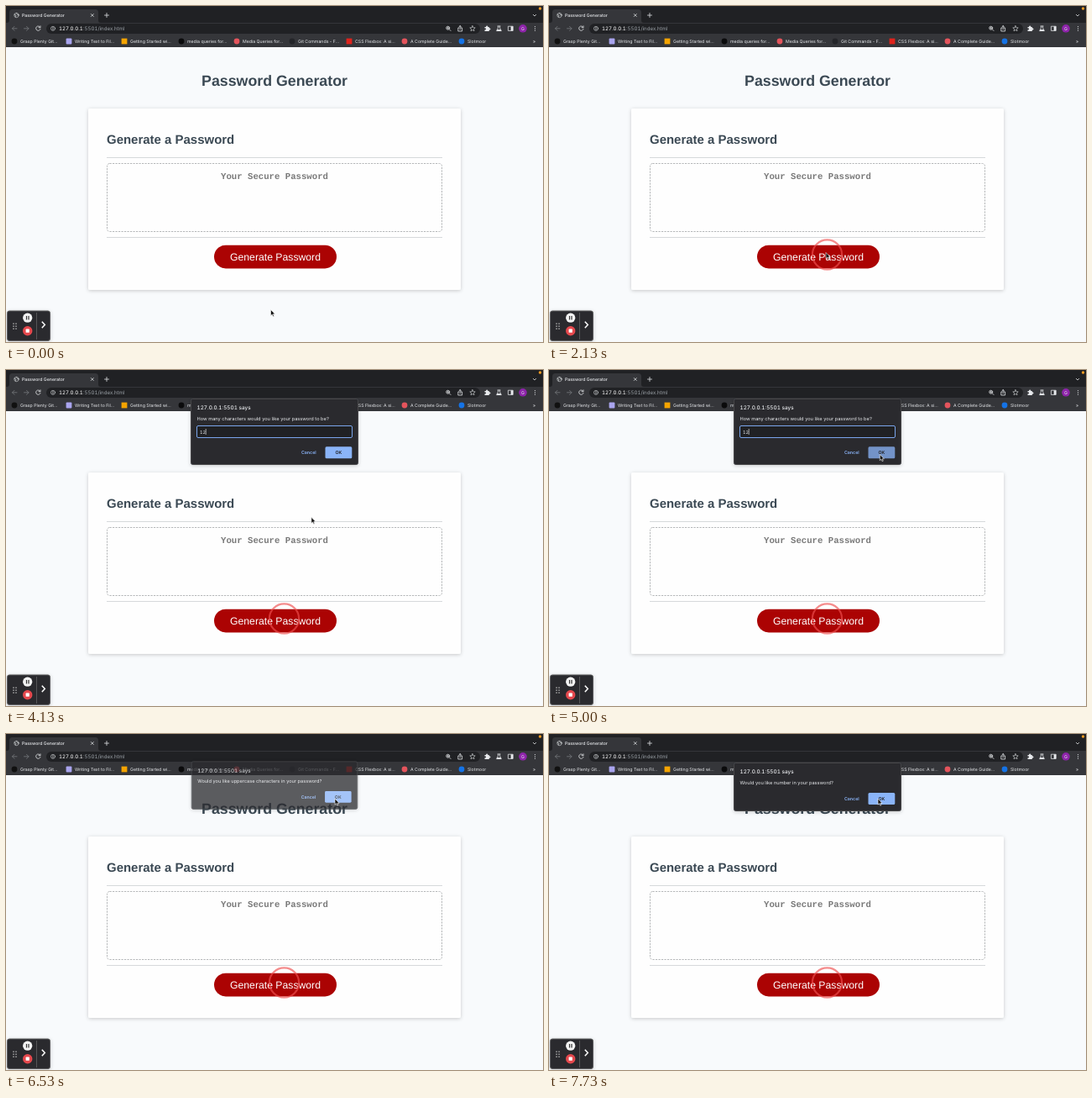
These frames come from a looping animation (640x400 px, 8000 ms). An HTML page:

```html
<!DOCTYPE html>
<html lang="en">
<head>
<meta charset="utf-8">
<title>Password Generator</title>
<style>
  html, body { margin: 0; width: 100%; height: 100%; overflow: hidden; background: #f8fafc; }
  svg { display: block; width: 100vw; height: 100vh; font-family: Inter, Roboto, sans-serif; text-rendering: geometricPrecision; }
  .page { font-family: "Liberation Sans", Arial, sans-serif; fill: #3b4954; }
  .mono { font-family: "Liberation Mono", "Courier New", monospace; }
  .line { fill: none; stroke: #e0e2e5; stroke-width: .8; stroke-linecap: round; stroke-linejoin: round; }
  .dim { stroke: #77797d; }
  .small { font-size: 5.22px; fill: #e8eaed; }
  .mid { text-anchor: middle; }
  .digits { font-feature-settings: "tnum"; }
</style>
</head>
<body>
<svg viewBox="0 0 640 400">
  <defs>
    <filter id="soft" x="-10%" y="-10%" width="120%" height="125%">
      <feDropShadow dx="0" dy="1" stdDeviation="2" flood-opacity=".2"/>
    </filter>
  </defs>

  <!-- page -->
  <rect width="640" height="400" fill="#f8fafc"/>
  <g class="page">
    <text class="mid" x="320" y="94.5" font-size="17.8" font-weight="700">Password Generator</text>
    <rect x="98" y="122" width="444" height="216" rx="2" fill="#fefefe" filter="url(#soft)"/>
    <text x="120" y="164.2" font-size="14.98" font-weight="700">Generate a Password</text>
    <path d="M120 180.500H520M120 275.500H520" stroke="#d6d9db"/>
    <rect x="120.5" y="187.5" width="399" height="81" rx="3" fill="none" stroke="#b4b6b8" stroke-dasharray="2.2 1.3"/>
    <text class="mono mid" x="320" y="206" font-size="10.67" font-weight="700" fill="#7a7a7a">Your Secure Password</text>
    <rect x="248" y="284.8" width="146" height="27.6" rx="13.8" fill="#ab0303"/>
    <text class="mid" x="321" y="302.7" font-size="12.22" fill="#fff">Generate Password</text>
  </g>
  <circle id="ring" cx="331.5" cy="296" fill="none" stroke="#f05050" stroke-width="2.2" stroke-opacity=".65"/>

  <!-- browser frame -->
  <rect width="640" height="20" fill="#202124"/>
  <path d="M1 20Q4 20 4 17V7.500Q4 4 7.500 4H106.500Q110 4 110 7.500V17Q110 20 113 20H640V49H0V20Z" fill="#35363a"/>
  <rect x="48" y="21" width="517" height="12" rx="6" fill="#202124"/>
  <g class="line">
    <g stroke-width=".6"><circle cx="12.500" cy="11" r="2.700"/><path d="M10 10.200L12 11L11.500 13M12.500 8.500L13.500 10.500L15 10.500"/></g>
    <path d="M101.300 9.500L104.300 12.500M104.300 9.500L101.300 12.500M117.500 11H122.500M120 8.500V13.500M628.300 10.300L630 12L631.700 10.300"/>
    <path class="dim" d="M13 26.800H7.500M10 24.300L7.500 26.800L10 29.300M21.500 26.800H27M24.500 24.300L27 26.800L24.500 29.300"/>
    <path d="M40.700 25.200A2.700 2.700 0 1 0 41 27.400M41 23.800V25.700H39"/>
    <circle cx="56" cy="26.800" r="2.500" stroke-width=".6"/><path d="M56 26.600V28.100M56 25.400V25.500"/>
    <circle cx="526.700" cy="26.200" r="2"/><path d="M528.200 27.700L530 29.500M525.800 26.200H527.600M526.700 25.300V27.100"/>
    <path d="M540 26H538.800V30H543.600V26H542.400M541.200 28V23.600M539.900 24.800L541.200 23.500L542.500 24.800"/>
    <path d="M556 23.600L556.900 25.700L559.200 25.900L557.500 27.400L558 29.700L556 28.500L554 29.700L554.500 27.400L552.800 25.900L555.100 25.700Z" stroke-width=".6"/>
    <path d="M586 24H589M586.500 24V26L584.700 29.600H590.300L588.500 26V24"/>
    <rect x="598.800" y="24.200" width="5.400" height="5.200"/>
  </g>
  <g fill="#e8eaed">
    <path d="M570.500 25H572.200A1.100 1.100 0 1 1 574.200 25H575.800V26.500A1.100 1.100 0 1 1 575.800 28.400V30H570.500V28.300A1 1 0 1 0 570.500 26.500ZM585.300 28L584.600 29.700H590.400L589.600 28ZM601.700 24.200H604.200V29.400H601.700Z"/>
    <circle cx="630.500" cy="24.500" r=".6"/><circle cx="630.500" cy="26.800" r=".6"/><circle cx="630.500" cy="29.100" r=".6"/>
  </g>
  <circle cx="616" cy="26.800" r="4.800" fill="#8e24aa"/>
  <text class="small mid" x="616" y="28.600">G</text>
  <circle cx="636.500" cy="3" r="1.700" fill="#f59b23"/>
  <text class="small" x="19" y="13" font-weight="500">Password Generator</text>
  <text class="digits" x="63" y="29" font-size="6.15" fill="#fff">127.0.0.1<tspan fill="#9aa0a6">:5501/index.html</tspan></text>
  <g id="marks" class="small"></g>
  <text class="small mid" x="629.500" y="43.500">»</text>

  <!-- recorder controls -->
  <rect x="1.500" y="363" width="51" height="35.500" rx="2.500" fill="#2b2b2d" stroke="#5c5c5e" filter="url(#soft)"/>
  <path d="M9 377.500V385M12 377.500V385" stroke="#aaa" stroke-width="1.400" stroke-dasharray="1.400 1.600"/>
  <path d="M36.500 365V397" stroke="#626264" stroke-width=".8"/>
  <circle cx="25.700" cy="371.200" r="5.600" fill="#f3f3f3"/>
  <path d="M24.500 368.900V373.500M27 368.900V373.500" stroke="#333" stroke-width="1.200"/>
  <circle cx="25.700" cy="386.700" r="5.700" fill="#e5484d"/>
  <rect x="23.600" y="384.600" width="4.200" height="4.200" rx=".6" fill="#fff"/>
  <path d="M42.800 375.800L46.300 379.500L42.800 383.200" fill="none" stroke="#fff" stroke-width="1.500"/>

  <!-- dialog -->
  <g id="dialog">
    <rect id="panel" x="220.500" y="34.500" width="199" rx="2" fill="#292a2d" stroke="#46474a" filter="url(#soft)"/>
    <text class="digits" x="227.500" y="47.400" font-size="6.4" font-weight="500" fill="#e8eaed">127.0.0.1:5501 says</text>
    <text id="message" x="227.500" y="60.400" font-size="5.67" fill="#e8eaed"></text>
    <g id="field">
      <rect x="227.500" y="66.500" width="185" height="14" rx="1.500" fill="#202124" stroke="#7aa5ec"/>
      <text id="typed" class="digits" x="231" y="75.500" font-size="5.4" fill="#e8eaed"></text>
      <rect id="caret" y="70" width=".6" height="7" fill="#fff"/>
    </g>
    <g id="buttons" font-size="5.3" font-weight="600" class="mid">
      <text x="360.800" y="9" fill="#8ab4f8">Cancel</text>
      <rect id="ok" x="380.500" width="31.800" height="14" rx="1.500"/>
      <text x="396.300" y="9" fill="#202124">OK</text>
    </g>
  </g>

  <path id="pointer" d="M0 0V7.200L1.700 5.700L2.800 8.200L4 7.700L2.900 5.300H5.100Z" fill="#111" stroke="#fff" stroke-width=".6"/>
</svg>
<script>
const LOOP = 8000;
const $ = id => document.getElementById(id);
const set = (id, attrs) => { for (const k in attrs) $(id).setAttribute(k, attrs[k]); };
const ramp = (t, start, length) => Math.min(1, Math.max(0, (t - start) / length));
const easeOut = p => 1 - (1 - p) ** 2;

// icon colour, corner radius, icon centre, label
const bookmarks = [
  ['#111', 3.4, 10, 'Grasp Plenty Git...'], ['#a9a4ee', 1, 75, 'Writing Text to Fil...'],
  ['#f5a400', 0, 141, 'Getting Started wi...'], ['#0b0b0c', 3.4, 209, 'media queries for...'],
  ['#e4545c', 3.4, 275, 'Media Queries for...'], ['#242529', 3.4, 341, 'Git Commands - F...'],
  ['#e0231c', 0, 409, 'CSS Flexbox: A si...'], ['#e4545c', 3.4, 475, 'A Complete Guide...'],
  ['#1573e6', 3.4, 543, 'Slotmoor']
];
$('marks').innerHTML = bookmarks.map(([color, round, x, label]) =>
  `<rect x="${x - 3.4}" y="38.600" width="6.800" height="6.800" rx="${round}" fill="${color}"/>
   <text x="${x + 7}" y="43.800">${label}</text>`).join('');

const ask = what => `Would you like ${what} in your password?`;
const dialogs = [
  { open: 2200, press: 4930, close: 5050, prompt: true, text: 'How many characters would you like your password to be?' },
  { open: 5170, press: 6130, close: 6330, text: ask('lower case characters') },
  { open: 6450, press: 7130, close: 7360, text: ask('uppercase characters') },
  { open: 7530, press: LOOP, close: LOOP, text: ask('number') }
];

// time, x, y of the pointer tip
const path = [
  [0, 315.5, 361.5], [60, 315.5, 361.5], [400, 317, 357], [1060, 317, 357], [1730, 330, 293.5],
  [3730, 330, 293.5], [4200, 366, 168], [4400, 366, 168], [4730, 394.3, 100.5],
  [5660, 394.3, 100.5], [5900, 392.8, 80], [6330, 392.8, 80], [6500, 392, 77], [LOOP, 392, 77]
];

function pointerAt(t) {
  const i = path.findIndex(p => p[0] > t);
  const [a, b] = [path[i - 1], path[i]];
  const p = ramp(t, a[0], b[0] - a[0]), e = p * p * (3 - 2 * p);
  return [a[1] + (b[1] - a[1]) * e, a[2] + (b[2] - a[2]) * e];
}

function drawDialog(t) {
  const d = dialogs.findLast(d => t >= d.open);
  const shown = d ? easeOut(ramp(t, d.open, 160)) * (1 - ramp(t, d.close, 110)) : 0;
  set('dialog', { opacity: shown });
  if (!d) return;
  const away = 1 - shown;
  set('dialog', { transform: `translate(320 ${35 - 7 * away}) scale(${1 - .03 * away}) translate(-320 -35)` });
  set('panel', { height: d.prompt ? 78 : 57 });
  set('buttons', { transform: `translate(0 ${d.prompt ? 91.2 : 69.9})` });
  set('ok', { fill: t >= d.press ? '#7393c8' : '#8ab4f8' });
  set('field', { display: d.prompt ? 'inline' : 'none' });
  $('message').textContent = d.text;

  const typed = t < 3430 ? '' : t < 3660 ? '1' : '12';
  const blinkStart = [2230, 3430, 3660][typed.length];
  $('typed').textContent = typed;
  set('caret', { x: 231 + 3.4 * typed.length, opacity: (t - blinkStart) % 1000 < 500 ? 1 : 0 });
}

function draw(now) {
  const t = now % LOOP;
  const press = easeOut(ramp(t, 2000, 120));
  set('ring', { r: 17.6 * press, opacity: press });
  set('pointer', { transform: `translate(${pointerAt(t)})` });
  drawDialog(t);
  requestAnimationFrame(draw);
}
draw(0);
</script>
</body>
</html>
```
